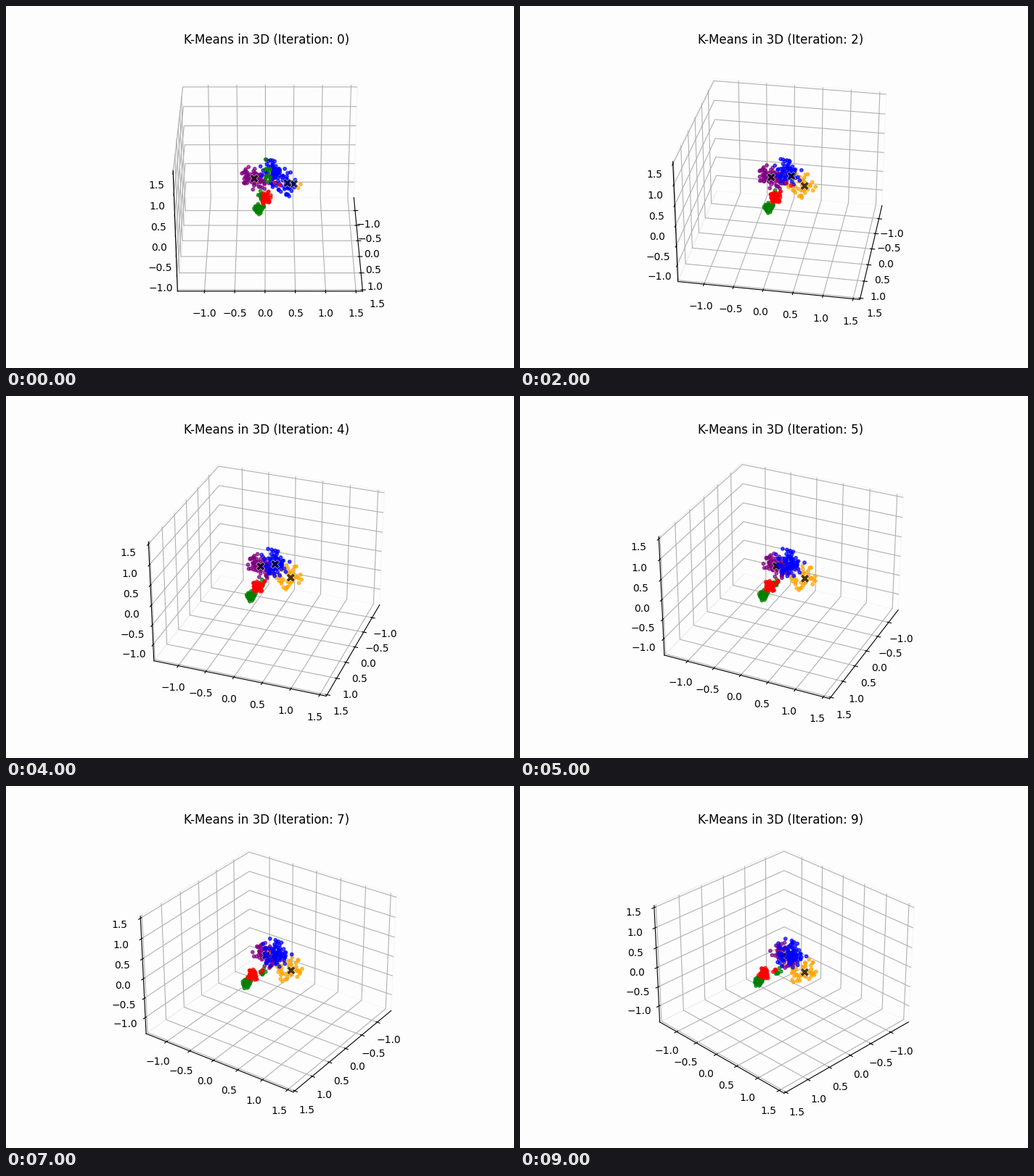
These frames come from a looping animation (700 by 500 pixels, 10000 ms). A matplotlib script:

```python
import numpy as np
import matplotlib.pyplot as plt
from matplotlib.animation import FuncAnimation

STEPS = 10
TURN = 5  # degrees per iteration
MID = np.array([0.028, 0.09, 0.058])

rng = np.random.default_rng(7)


def blob(n, mean, sd):
    noise = np.clip(rng.normal(size=(n, 3)), -2.1, 2.1)
    return MID + np.array(mean) + noise * np.array(sd)


MEANS = {
    "purple": (-0.25, -0.28, -0.03),
    "orange": (-0.18, 0.29, -0.125),
    "blue": (-0.06, 0.04, 0.26),
    "green": (0.425, -0.195, -0.283),
    "red": (0.398, -0.085, -0.03),
}

GROUPS = {
    "purple": blob(80, MEANS["purple"], (0.08, 0.12, 0.13)),
    "orange": blob(48, MEANS["orange"], (0.14, 0.12, 0.10)),
    "blue": blob(72, MEANS["blue"], (0.11, 0.11, 0.15)),
    "green": np.vstack([
        blob(45, MEANS["green"], (0.035, 0.04, 0.045)),
        blob(8, (0.02, -0.16, -0.27), (0.05, 0.03, 0.04)),
    ]),
    "red": np.vstack([
        blob(58, MEANS["red"], (0.045, 0.042, 0.055)),
        blob(3, (0.20, -0.05, -0.05), (0.02, 0.02, 0.02)),
    ]),
}
STRAYS = MID + np.array([(0.22, 0.15, 0.17), (0.24, 0.07, 0.24)])

POINTS = np.vstack([*GROUPS.values(), STRAYS])
FINAL = np.array(
    [name for name, pts in GROUPS.items() for _ in pts] + ["blue"] * len(STRAYS)
)

# Starting offsets of the centroids that still have to settle
START = {"blue": (-0.04, 0.25, -0.29), "orange": (0.08, 0.11, 0.075)}
ZORDER = {"purple": 1, "orange": 2, "blue": 3, "green": 6, "red": 7}


def labels_at(step):
    lab = FINAL.copy()
    if step < 3:
        lab[-len(STRAYS):] = "red"
    if step == 0:
        x, y, _ = (POINTS - MID).T
        lab[(FINAL == "orange") & (y < 0.43)] = "blue"
        lab[(FINAL == "blue") & (np.abs(y + 0.06) < 0.06) & (x > -0.12)] = "green"
        lab[(FINAL == "red") & (y < -0.14)] = "green"
    return lab


def centroids_at(step):
    return np.array([
        MID + np.array(mean) + np.array(START.get(name, (0, 0, 0))) * 0.5 ** step
        for name, mean in MEANS.items()
    ])


fig = plt.figure(figsize=(7, 5), dpi=100, facecolor="#fdfdfd")
ax = fig.add_subplot(projection="3d", computed_zorder=False)
ax.set_facecolor("none")
for axis in (ax.xaxis, ax.yaxis, ax.zaxis):
    axis.pane.set_fill(False)


def draw(step):
    for old in list(ax.collections):
        old.remove()
    lab = labels_at(step)
    for name, order in ZORDER.items():
        if name == "blue" and step >= 5:
            order = 5
        ax.scatter(*POINTS[lab == name].T, c=name, s=10, alpha=0.7, zorder=order)
    ax.scatter(*centroids_at(step).T, c="black", marker="X", s=75, alpha=0.7,
               edgecolors="white", linewidths=0.5, zorder=4)

    ax.set_xlim3d(-1.455, 1.54, view_margin=0)
    ax.set_ylim3d(-1.445, 1.612, view_margin=0)
    ax.set_zlim3d(-1.424, 1.552, view_margin=0)
    for axis in (ax.xaxis, ax.yaxis, ax.zaxis):
        axis.set_ticks(np.arange(-1, 1.6, 0.5))
    ax.view_init(elev=30, azim=TURN * step + 0.01)
    ax.set_title(f"K-Means in 3D (Iteration: {step})")
    return []


anim = FuncAnimation(fig, draw, frames=STEPS, init_func=lambda: draw(0),
                     interval=1000, repeat=True, repeat_delay=0, blit=False)
plt.show()
```
